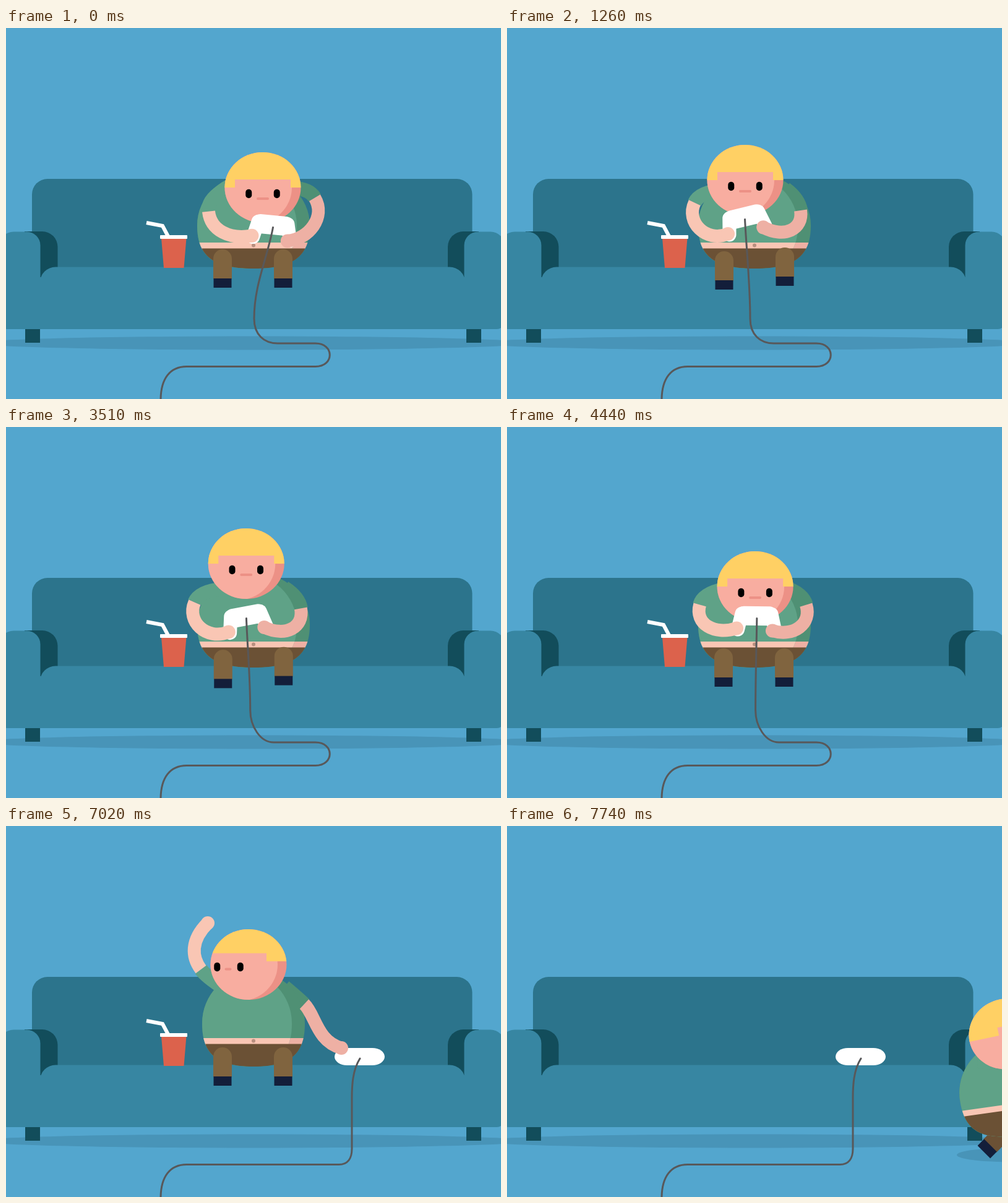
An HTML page with a canvas that plays this animation: 800x600 px, repeating every 7770 ms.

```html
<!DOCTYPE html>
<html lang="en">
<head>
<meta charset="utf-8">
<title>Couch gamer</title>
<style>
html, body { margin: 0; width: 100%; height: 100%; overflow: hidden; background: #53a6ce; }
canvas { display: block; width: 800px; height: 600px; }
</style>
</head>
<body>
<canvas id="stage" width="800" height="600"></canvas>
<script>
const g = document.getElementById('stage').getContext('2d');
const LOOP = 7770, STEP = 30, SWAY = 2520, TOSSED = 7020, GRAB = 7200, END = 7740;
const C = {
  wall: '#53a6ce', shade: '#4894b8', back: '#2c748c', seat: '#3786a2', deep: '#124d5b',
  shirt: '#5fa287', shirtDark: '#4f9074', skin: '#f9c6b4', skinDark: '#eeb0a4',
  face: '#f8ada0', blush: '#ec9186', hair: '#ffd064', shorts: '#6b5135', leg: '#80643f',
  shoe: '#131e3a', cup: '#dc624c', cord: '#58585a', navel: '#b98f7f'
};

// Arm poses: cuff, two curve controls, hand
const RAISED = [315, 232, 300, 212, 298, 185, 326, 157];
const REACH = [482, 288, 500, 305, 502, 348, 542, 359];
const TAKE = [308, 285, 296, 315, 285, 345, 272, 360];
const CARRY = [410, 285, 420, 310, 440, 320, 470, 310];

const mix = (a, b, k) => a + (b - a) * k;
const blend = (p, q, k) => p.map((v, i) => mix(v, q[i], k));
const rad = d => d * Math.PI / 180;
function ramp(t, a, b) {
  const u = Math.min(1, Math.max(0, (t - a) / (b - a)));
  return u * u * (3 - 2 * u);
}

function rect(color, x, y, w, h, r = 0) {
  g.fillStyle = color;
  g.beginPath();
  g.roundRect(x, y, w, h, r);
  g.fill();
}
function oval(color, x, y, rx, ry) {
  g.fillStyle = color;
  g.beginPath();
  g.ellipse(x, y, rx, ry, 0, 0, 7);
  g.fill();
}
function line(color, width, path, cap = 'butt') {
  g.strokeStyle = color;
  g.lineWidth = width;
  g.lineCap = cap;
  g.stroke(path);
}
function group(draw, x = 0, y = 0, angle = 0) {
  g.save();
  g.translate(x, y);
  g.rotate(rad(angle));
  draw();
  g.restore();
}

function drawRoom() {
  rect(C.wall, 0, 0, 800, 600);
  oval(C.shade, 400, 509.5, 445, 11);
  rect(C.deep, 31, 485, 24, 24);
  rect(C.deep, 744, 485, 24, 24);
  rect(C.back, 42, 244, 711.5, 180, 25);
  rect(C.deep, 30, 329, 53.5, 90, [0, 25, 0, 0]);
  rect(C.deep, 714, 329, 50, 90, [25, 0, 0, 0]);
  rect(C.seat, 55, 386.5, 687, 100.5, [25, 25, 0, 0]);
  rect(C.seat, -10, 329.5, 65.5, 157.5, [22, 22, 0, 12]);
  rect(C.seat, 740.5, 329.5, 65, 157.5, [22, 22, 12, 0]);
  rect(C.seat, 50, 403, 700, 84);
}

function drawCup(x, y) {
  group(() => {
    line('#fff', 6, new Path2D('M227 315 L253 320 L262 337'));
    g.fillStyle = C.cup;
    g.fill(new Path2D('M251 340H291.5L287.5 388H255Z'));
    rect('#fff', 249, 335, 44, 6, 1);
  }, x, y);
}

function bodyPath(w, dx) {
  const p = new Path2D(), m = 400 + dx, k = w * .77;
  p.ellipse(m, 319, w, 84, 0, Math.PI, 2 * Math.PI);
  p.bezierCurveTo(m + w, 365, m + k, 389, m, 389);
  p.bezierCurveTo(m - k, 389, m - w, 365, m - w, 319);
  return p;
}
function drawBody(w, waist) {
  group(() => {
    g.clip(bodyPath(w, 0));
    rect(C.shirtDark, 300, 230, 200, 160);
    rect(C.skinDark, 300, waist, 200, 11);
    group(() => {
      g.clip(bodyPath(w, -21));
      rect(C.shirt, 280, 230, 220, 160);
      rect(C.skin, 280, waist, 220, 11);
    });
    rect(C.shorts, 300, waist + 9.5, 200, 60);
  });
  oval(C.navel, 400, waist + 4.5, 3, 3);
}

// Hands hold the pad; cuffs and elbows follow how far each hand has shifted.
function gripArms({ x, y, angle }) {
  const c = Math.cos(rad(angle)), s = Math.sin(rad(angle));
  const hold = (dx, dy) => [x + dx * c - dy * s, y + dx * s + dy * c];
  const [lx, ly] = hold(-32, 18), [rx, ry] = hold(26, 21);
  const a = lx - 370, b = rx - 430;
  const lc = [311 + .6 * a, 287 + .35 * a], rc = [484 + .6 * b, 287 - .5 * b];
  return {
    left: [...lc, lc[0] - 9 + .45 * a, lc[1] + 31, lx - 36, ly + 12 - .2 * a, lx, ly],
    right: [...rc, rc[0] + 10 + .35 * b, rc[1] + 31, rx + 34, ry + 10 - .5 * b, rx, ry]
  };
}
function drawSleeve(a, sx, sy, color) {
  const p = new Path2D();
  p.moveTo(sx, sy);
  p.quadraticCurveTo(a[0] + .6 * (a[0] - a[2]), a[1] + .6 * (a[1] - a[3]), a[0], a[1]);
  line(color, 23, p);
}
function drawArm(a, color) {
  const p = new Path2D();
  p.moveTo(a[0], a[1]);
  p.bezierCurveTo(...a.slice(2));
  line(color, 21, p);
  oval(color, a[6], a[7], 11, 11);
}

function drawLegs(t, lift, stand) {
  const swing = 53 * stand * Math.cos((END - t) / 360 * 2 * Math.PI);
  for (const side of [1, -1]) group(() => {
    rect(stand > .5 ? C.shorts : C.leg, -15, -14, 30, 48, [15, 15, 0, 0]);
    rect(C.shoe, -14.5, 33, 29, 15);
  }, mix(399 - 49 * side + lift / 3, 400 - 20 * side, stand), mix(372 + lift * side, 379, stand), swing * side);
}

function drawHead({ x, y, lx, ly, eye, mouth, tilt }) {
  group(() => {
    g.beginPath();
    g.ellipse(0, 0, 61.5, 57, 0, 0, 7);
    g.clip();
    rect(C.blush, -65, -60, 130, 120);
    oval(C.face, -14, 0, 61, 59);
    const fringe = -13 + ly * .87, gap = 22.75 - 4 * Math.min(1, Math.abs(lx));
    rect(C.hair, -65, -70, 130, 70 + fringe);
    rect(C.hair, -95 + 16 * lx, fringe - 1, 50, 14);
    rect(C.hair, 45 + 16 * lx, fringe - 1, 50, 14);
    const w = 10 * eye, h = 14.5 * eye;
    for (const s of [-1, 1])
      rect('#000', 32 * lx + gap * s - w / 2, 10 + ly - h / 2, w, h, w / 2);
    rect(C.blush, 33 * lx - mouth / 2, 6 + ly + mouth / 2, mouth, 4, 2);
  }, x, y, tilt);
}

function drawPad({ x, y, angle, flat }) {
  group(() => {
    const w = mix(32, 40.5, flat), top = mix(-18, -14, flat), low = mix(13, 14, flat);
    rect('#fff', -w, top, 2 * w, low - top, { x: mix(11, 20, flat), y: mix(11, 14, flat) });
    for (const s of [-1, 1]) {
      const grip = new Path2D();
      grip.moveTo(s * 24, mix(-6, 0, flat));
      grip.lineTo(s * mix(30, 28, flat), mix(20, 0, flat));
      line('#fff', 22, grip, 'round');
    }
  }, x, y, angle);
}

function drawCord(pad, bx, by, ex, taut) {
  const x = pad.x + .5, y = pad.y + mix(1.5, 3, taut);
  const m = (a, b) => mix(a, b, taut);
  const p = new Path2D();
  p.moveTo(x, y);
  p.bezierCurveTo(m(x - (x - bx) * .3, 560), m(y + 50, 395), bx, m(by - 55, 420), bx, by);
  p.bezierCurveTo(bx, by + 26, m(ex - 22, 559), m(510, 490), ex, m(510, 500));
  p.lineTo(m(500, 559), m(510, 522));
  p.bezierCurveTo(m(531, 559), m(510, 538), m(531, 552), 547.5, m(500, 538), 547.5);
  p.lineTo(292, 547.5);
  p.bezierCurveTo(265, 547.5, 250, 567, 250, 602);
  line(C.cord, 3, p, 'round');
}

function draw(t) {
  const slump = 1 - ramp(t, 0, 1000);
  const lean = Math.cos(t / SWAY * 2 * Math.PI) * (1 - ramp(t, 4440, 4800));
  const look = ramp(t, 4650, 5150);
  const toss = ramp(t, 6100, 6700);
  const stand = ramp(t, 7220, 7440);
  const away = Math.max(0, (t - GRAB) / (END - GRAB));
  const sit = ramp(t, 2600, 3500), sink = ramp(t, 3700, 4440);

  const head = {
    x: 400 + 15 * lean - 13 * look + 5 * toss + 13 * stand,
    y: 246 + 12 * slump - 25 * sit + 37 * sink - 22 * look - 12 * toss,
    lx: 3 * stand - look,
    ly: 25 * toss + 6 * stand - 31 * look,
    eye: 1 - .34 * (look - toss),
    mouth: 20 - 9 * toss,
    tilt: -4 * stand
  };
  const pad = {
    x: mix(402 + 18 * lean + 11 * slump, 571.5, toss),
    y: mix(308 + 13 * slump, 373, toss),
    angle: (13.5 * lean - 8 * slump) * (1 - toss),
    flat: toss
  };
  const grip = gripArms(pad);
  const right = blend(grip.right, REACH, toss);
  const raised = blend(grip.left, RAISED, toss);
  const left = blend(blend(raised, TAKE, ramp(t, TOSSED, GRAB)), CARRY, ramp(t, GRAB, END));

  const bend = 401 + 8 * (lean - slump);
  const drawGame = () => {
    drawPad(pad);
    drawCord(pad, mix(bend, 559, toss), mix(470 - 12 * sit, 440, toss), mix(bend + 38 + 20 * look, 559, toss), toss);
  };
  const shift = 416 * away, tapping = 3 * Math.max(0, -lean), leaving = t > TOSSED;

  drawRoom();
  if (t < GRAB) drawCup(0, 0);
  if (leaving) drawGame();
  if (stand > .5) oval(C.shade, 401 + shift, 532, 90 * stand, 11.5 * stand);

  group(() => {
    g.translate(-400, -318);
    drawSleeve(right, 450, 260, C.shirtDark);
    if (stand > .5) drawLegs(t, 0, stand);
    drawBody(91 - 8 * toss + 2 * stand, 347 - 4 * toss - 6 * stand);
    drawSleeve(left, 352, 262, C.shirt);
    if (stand <= .5) drawLegs(t, tapping, stand);
    drawHead(head);
    if (!leaving) drawGame();
    drawArm(right, C.skinDark);
    if (t >= GRAB) drawCup(left[6] - TAKE[6], left[7] - TAKE[7]);
    drawArm(left, C.skin);
  }, 400 + shift, 318 + 112 * stand - 30 * Math.sin(Math.PI * away), -8 * stand);
}

function tick() {
  const t = performance.now() % LOOP;
  draw(Math.floor(t / STEP) * STEP);
  requestAnimationFrame(tick);
}
tick();
</script>
</body>
</html>
```
